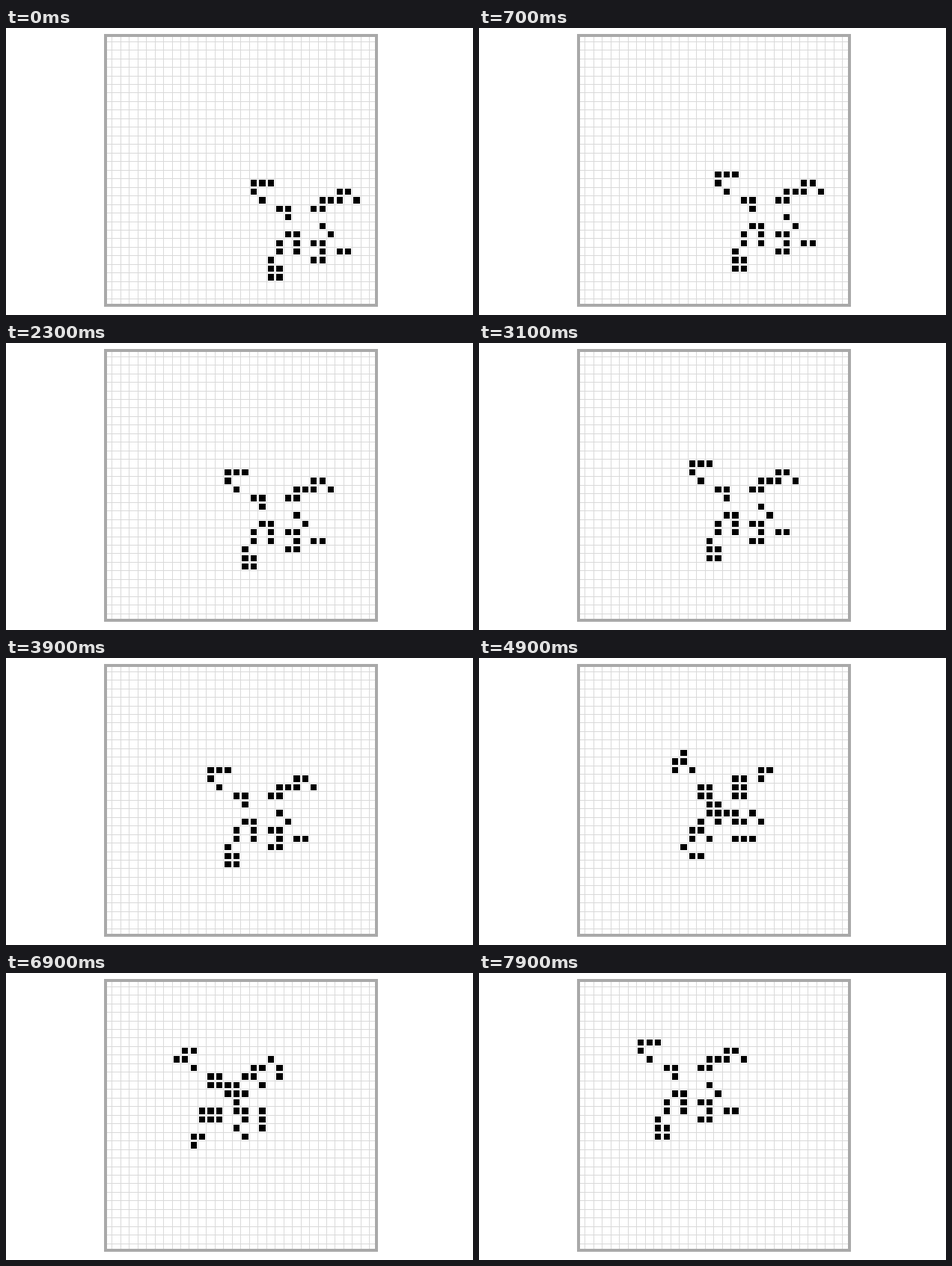
Write a matplotlib script that moves like this. It is 624 px wide and 384 px high and loops after 8000 ms.

```python
import numpy as np
import matplotlib.pyplot as plt
from matplotlib.animation import FuncAnimation
from matplotlib.collections import PolyCollection
from matplotlib.patches import Rectangle

W, H, DPI = 624, 384, 100
SIZE = 32                     # cells per side of the board
PITCH = 11.47                 # pixels per cell
LEFT, TOP = 130.28, 6.69      # corner of cell (0, 0)
FRAME = (131, 7.5, 497, 373)  # outer edges of the border
EDGE = 4
STEP_MS, TICK_MS, LOOP_MS = 200, 100, 8000

# Live columns in each row of the ship, whose corner is at cell (17, 17)
SHIP = [
    (0, 1, 2), (0, 10, 11), (1, 8, 9, 10, 12), (3, 4, 7, 8),
    (4,), (8,), (4, 5, 9), (3, 5, 7, 8),
    (3, 5, 8, 10, 11), (2, 7, 8), (2, 3), (2, 3),
]
START = 17


def seed():
    board = np.zeros((SIZE, SIZE), dtype=int)
    for r, cols in enumerate(SHIP):
        board[START + r, [START + c for c in cols]] = 1
    return board


def evolve(board):
    """One generation of Conway's Game of Life."""
    near = sum(np.roll(board, (dy, dx), (0, 1))
               for dy in (-1, 0, 1) for dx in (-1, 0, 1)) - board
    return ((near == 3) | ((board == 1) & (near == 2))).astype(int)


def span(start, k):
    """Whole-pixel edges of cell k along one axis."""
    mid = start + PITCH * (k + 0.5)
    return np.floor(mid - 3.66), np.ceil(mid + 3.66)


def squares(board):
    polys = []
    for r, c in np.argwhere(board):
        x0, x1 = span(LEFT, c)
        y0, y1 = span(TOP, r)
        polys.append([(x0, y0), (x1, y0), (x1, y1), (x0, y1)])
    return polys


def block(x0, y0, x1, y1, color, z):
    ax.add_patch(Rectangle((x0, y0), x1 - x0, y1 - y0,
                           facecolor=color, linewidth=0, zorder=z))


fig = plt.figure(figsize=(W / DPI, H / DPI), dpi=DPI, facecolor="white")
ax = fig.add_axes([0, 0, 1, 1])
ax.set_xlim(0, W)
ax.set_ylim(H, 0)
ax.axis("off")

fx0, fy0, fx1, fy1 = FRAME
for k in range(1, SIZE):
    x = np.floor(LEFT + PITCH * k)
    y = np.floor(TOP + PITCH * k)
    block(x, fy0, x + 1, fy1, "#d9d9d9", 1)
    block(fx0, y, fx1, y + 1, "#d9d9d9", 1)

block(fx0, fy0, fx1, fy0 + EDGE, "#a9a9a9", 3)
block(fx0, fy1 - EDGE, fx1, fy1, "#a9a9a9", 3)
block(fx0, fy0, fx0 + EDGE, fy1, "#a9a9a9", 3)
block(fx1 - EDGE, fy0, fx1, fy1, "#a9a9a9", 3)

boards = [seed()]
for _ in range(LOOP_MS // STEP_MS):
    boards.append(evolve(boards[-1]))

cells = PolyCollection(squares(boards[0]), facecolors="black",
                       linewidths=0, zorder=2)
ax.add_collection(cells, autolim=False)


def draw(i):
    # The first generation is held for only half a step
    gen = (i * TICK_MS + STEP_MS // 2) // STEP_MS
    cells.set_verts(squares(boards[gen]))
    return (cells,)


anim = FuncAnimation(fig, draw, frames=LOOP_MS // TICK_MS,
                     interval=TICK_MS, repeat=True, repeat_delay=0)
plt.show()
```
